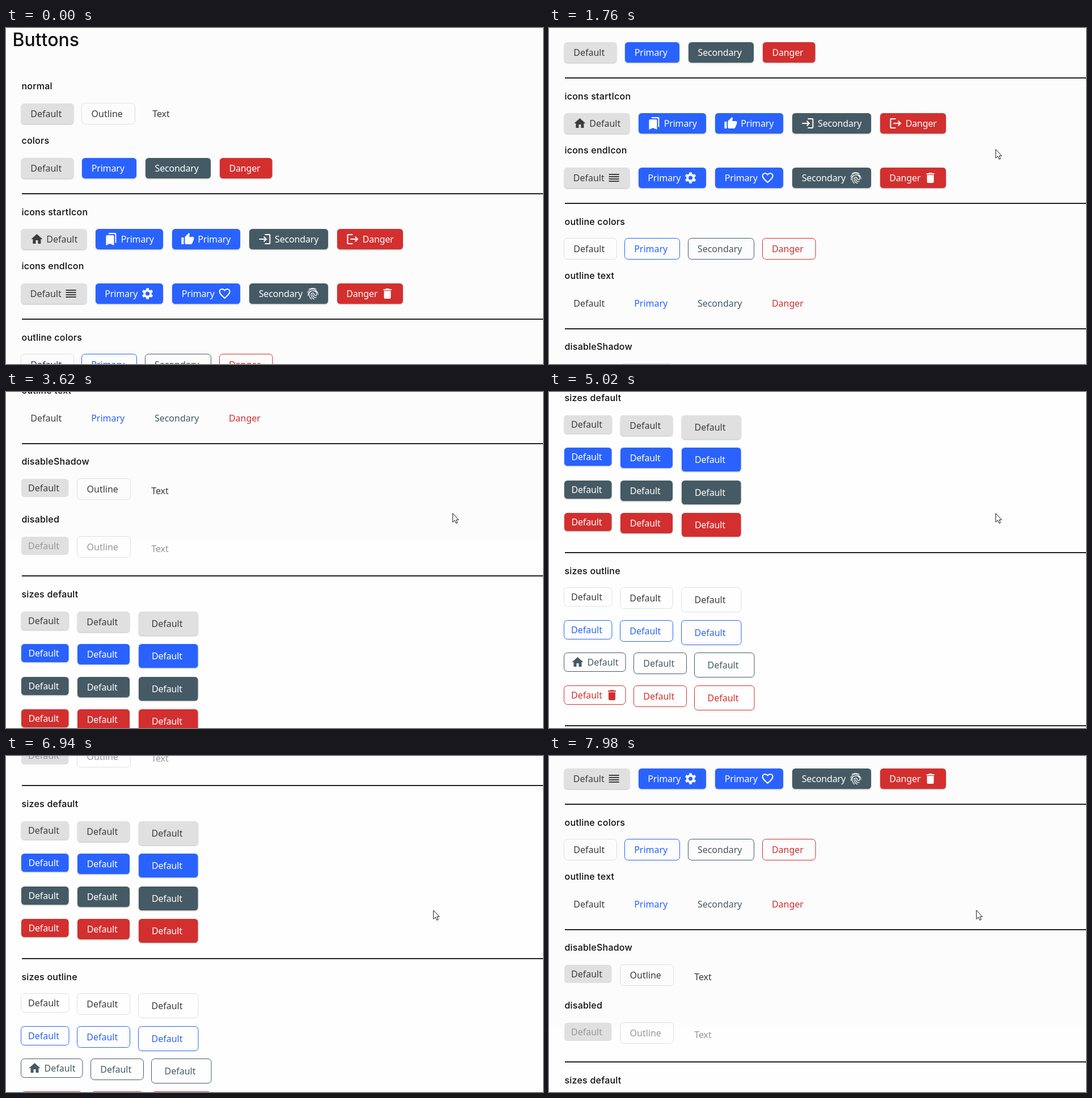
An HTML page that plays this animation: 947x592 px, repeating every 8 s.

```html
<!DOCTYPE html>
<html lang="en">
<head>
<meta charset="utf-8">
<title>Buttons</title>
<style>
  html, body { margin: 0; width: 100%; height: 100%; overflow: hidden; background: #fefefe; }
  svg { display: block; width: 947px; height: 592px; }
  text { font: 400 16px "Noto Sans", sans-serif; }
  .title, .head { font-family: Inter, sans-serif; font-weight: 500; fill: #0c0c0c; }
  .title { font-size: 32px; }
  .head { letter-spacing: .22px; }
  .label { text-anchor: middle; }
  .bold { font-weight: 500; letter-spacing: -.15px; }
  .raised { filter: drop-shadow(0 1.5px 1.3px rgba(0, 0, 0, .27)); }
  .line { fill: none; stroke: currentColor; }
</style>
</head>
<body>
<svg viewBox="0 0 947 592">
  <defs>
    <path id="home" d="M10 20v-6h4v6h5v-8h3L12 3 2 12h3v8z"/>
    <path id="marks" d="M19 18l2 1V3c0-1.1-.9-2-2-2H9C7.900 1 7 1.900 7 3h10c1.100 0 2 .9 2 2zM15 5H5c-1.100 0-2 .9-2 2v16l7-3 7 3V7c0-1.100-.9-2-2-2z"/>
    <path id="thumb" d="M1 21h4V9H1zM23 10c0-1.100-.9-2-2-2h-6.300l1-4.900c0-.4-.2-.8-.5-1.100L14.200 1 7.600 7.600C7.200 8 7 8.500 7 9v10c0 1.100.9 2 2 2h9c.8 0 1.500-.5 1.800-1.200l3-7.100c.1-.2.2-.4.2-.7z"/>
    <path id="login" d="M11 7 9.600 8.400l2.600 2.600H2v2h10.200l-2.600 2.600L11 17l5-5zM20 19h-8v2h8c1.100 0 2-.9 2-2V5c0-1.100-.9-2-2-2h-8v2h8z"/>
    <path id="logout" d="M17 7l-1.400 1.400 2.600 2.600H8v2h10.200l-2.600 2.600L17 17l5-5zM4 5h8V3H4c-1.100 0-2 .9-2 2v14c0 1.100.9 2 2 2h8v-2H4z"/>
    <path id="list" d="M3 5h18v2H3zM3 9h18v2H3zM3 13h18v2H3zM3 17h18v2H3z"/>
    <g id="gear" class="line">
      <circle cx="12" cy="12" r="5.500" stroke-width="3.800"/>
      <g stroke-width="4.600">
        <path id="teeth" d="M12 2.200v4M12 17.800v4"/>
        <path d="M12 2.200v4M12 17.800v4" transform="rotate(60 12 12)"/>
        <path d="M12 2.200v4M12 17.800v4" transform="rotate(120 12 12)"/>
      </g>
    </g>
    <path id="heart" class="line" stroke-width="2" d="M12 20C6 14.600 3 12 3 8.500 3 6 5 4 7.500 4c1.700 0 3.400.9 4.500 2.400C13.100 4.900 14.800 4 16.500 4 19 4 21 6 21 8.500c0 3.500-3 6.100-9 11.500z"/>
    <path id="finger" class="line" stroke-width="1.150" stroke-linecap="round" d="M5.700 4.300q6.300-3.300 12.600 0M3.300 9.700q8.700-11.400 17.400 0M9.800 21.700C6.800 18.700 6 16 6 13c0-8 13.500-8 13.500 0 0 3.200-4.800 3.200-4.800 0 0-3.200-5.200-3-5.200.2 0 3.800 2 7.300 5.600 8.400M4.200 15.500C2.700 5 21 3.500 21.700 13.500M12 13c0 4 2.300 6.200 6.500 5.600"/>
    <path id="trash" d="M6 19c0 1.100.9 2 2 2h8c1.100 0 2-.9 2-2V7H6zM19 4h-3.500l-1-1h-5l-1 1H5v2h14z"/>
  </defs>
  <g id="page"></g>
  <path id="cursor" fill="#fff" stroke="#15151f" d="M.8.800V16.300L4.300 13 6.900 18.300 9.200 17.300 6.900 12.200H11.300Z"/>
</svg>
<script>
const page = document.getElementById('page');
const cursor = document.getElementById('cursor');
const ink = '#3c3c3c';
const colors = { Default: '#e0e0e0', Primary: '#2962ff', Secondary: '#455a64', Danger: '#d32f2f' };
const palette = Object.values(colors);
let out = '';

const rect = (x, y, w, h, rest) => out += `<rect x="${x}" y="${y}" width="${w}" height="${h}" ${rest}/>`;
const head = (y, s) => out += `<text class="head" x="27.500" y="${y}">${s}</text>`;
const rule = y => rect(28, y, 919, 2, 'fill="#222"');
const label = (cx, cy, s, fill, bold) =>
  out += `<text class="label${bold ? ' bold' : ''}" x="${cx}" y="${cy + 5.8}" fill="${fill}">${s}</text>`;

// kind: fill, flat (no shadow), line or text; side: -1 start icon, 1 end icon
function button(x, y, w, h, s, o = {}) {
  const { kind = 'fill', color = colors.Default, icon, side = 0 } = o;
  const grey = color === colors.Default;
  const solid = kind === 'fill' || kind === 'flat';
  const fill = o.ink || (grey ? ink : solid ? '#fff' : color);
  if (solid) rect(x, y, w, h, `rx="5.500" fill="${color}"${kind === 'fill' ? ' class="raised"' : ''}`);
  if (kind === 'line') rect(x - .5, y - .5, w + 1, h + 1, `rx="6" fill="none" stroke="${color}"`);
  label(x + w / 2 + (side ? -14.2 * side : -2.3), y + h / 2, s, fill, solid && !grey);
  if (icon) {
    const pad = h < 36 ? 23.5 : 27.4;
    const cx = side < 0 ? x + pad : x + w - pad;
    out += `<use href="#${icon}" x="${cx - 12}" y="${y + h / 2 - 12}" fill="${fill}" color="${fill}"/>`;
  }
}

const colorRow = (y, kind) => [[27, 92], [134, 96], [246, 115], [377, 92.5]].forEach(([x, w], i) => {
  const s = Object.keys(colors)[i];
  button(x, y, w, 36, s, { kind, color: colors[s] });
});

const iconRow = (y, side, icons) => [
  [27, 115, 'Default'], [158, 119, 'Primary'], [293, 120, 'Primary'], [429, 139, 'Secondary'], [584, 116, 'Danger']
].forEach(([x, w, s], i) => button(x, y, w, 36, s, { color: colors[s], icon: icons[i], side }));

function plainRow(y, fill) {
  button(27, y, 83.5, 32, 'Default', { kind: 'flat', ink: fill });
  button(126, y, 93, 36, 'Outline', { kind: 'line', ink: fill });
  label(271.5, y + 21, 'Text', fill);
}

function sizeRow(y, kind, color, icon, side) {
  const dx = icon ? 24 : 0;
  button(27, y, 83.5 + dx, 32, 'Default', { kind, color, icon, side });
  button(126 + dx, y, 92, 36, 'Default', { kind, color });
  button(234 + dx - (icon ? 1 : 0), y, 104.5, 42, 'Default', { kind, color });
}

rect(0, 0, 947, 905, 'fill="#fcfcfc"');
rect(0, 905, 947, 815, 'fill="#fefefe"');
out += '<text class="title" x="11.500" y="32">Buttons</text>';

head(108, 'normal');
button(27, 133, 92, 36, 'Default');
button(134, 133, 93, 36, 'Outline', { kind: 'line' });
label(273.5, 151, 'Text', ink);
head(204, 'colors');
colorRow(229, 'fill');
rule(291);

head(329.5, 'icons startIcon');
iconRow(354, -1, ['home', 'marks', 'thumb', 'login', 'logout']);
head(425, 'icons endIcon');
iconRow(450, 1, ['list', 'gear', 'heart', 'finger', 'trash']);
rule(512);

head(550.5, 'outline colors');
colorRow(575, 'line');
head(646, 'outline text');
colorRow(671, 'text');
rule(733);

head(771, 'disableShadow');
plainRow(796, ink);
head(872.5, 'disabled');
plainRow(898, '#989898');
rule(966);

head(1005, 'sizes default');
[1030, 1087, 1145, 1202].forEach((y, i) => sizeRow(y, 'fill', palette[i]));
rule(1271);

head(1309.5, 'sizes outline');
[1334, 1392, 1449, 1507].forEach((y, i) =>
  sizeRow(y, 'line', palette[i], [, , 'home', 'trash'][i], [0, 0, -1, 1][i]));
rule(1576);

page.innerHTML = out;

// Each wheel notch moves the page 100px; the last one down reaches the page end.
const down = [1090, 1335, 1737, 2085, 2976, 3240, 3535, 3840, 4750, 4874, 5010];
const up = [6370, 6630, 6896, 6985, 7185, 7365, 7788];
const notches = [...down.map(s => [s, 100]), [5345, 28], ...up.map(s => [s, -100])];

const ease = p => (1 - Math.cos(Math.PI * Math.min(1, Math.max(0, p)))) / 2;
const scrollAt = t => notches.reduce((sum, [s, d]) => sum + d * ease((t - s) / 190), 0);

const start = performance.now();
function draw() {
  const t = (performance.now() - start) % 8000;
  page.setAttribute('transform', `translate(0 ${-Math.round(scrollAt(t))})`);
  const enter = 1 - ease((t + 10) / 620), shift = ease((t - 5960) / 210);
  const x = 787 + 110 * enter - 34 * shift;
  const y = 213 + 375 * enter + 58 * shift;
  cursor.setAttribute('transform', `translate(${Math.round(x)} ${Math.round(y)})`);
  cursor.style.visibility = t < 30 ? 'hidden' : 'visible';
  requestAnimationFrame(draw);
}
draw();
</script>
</body>
</html>
```
